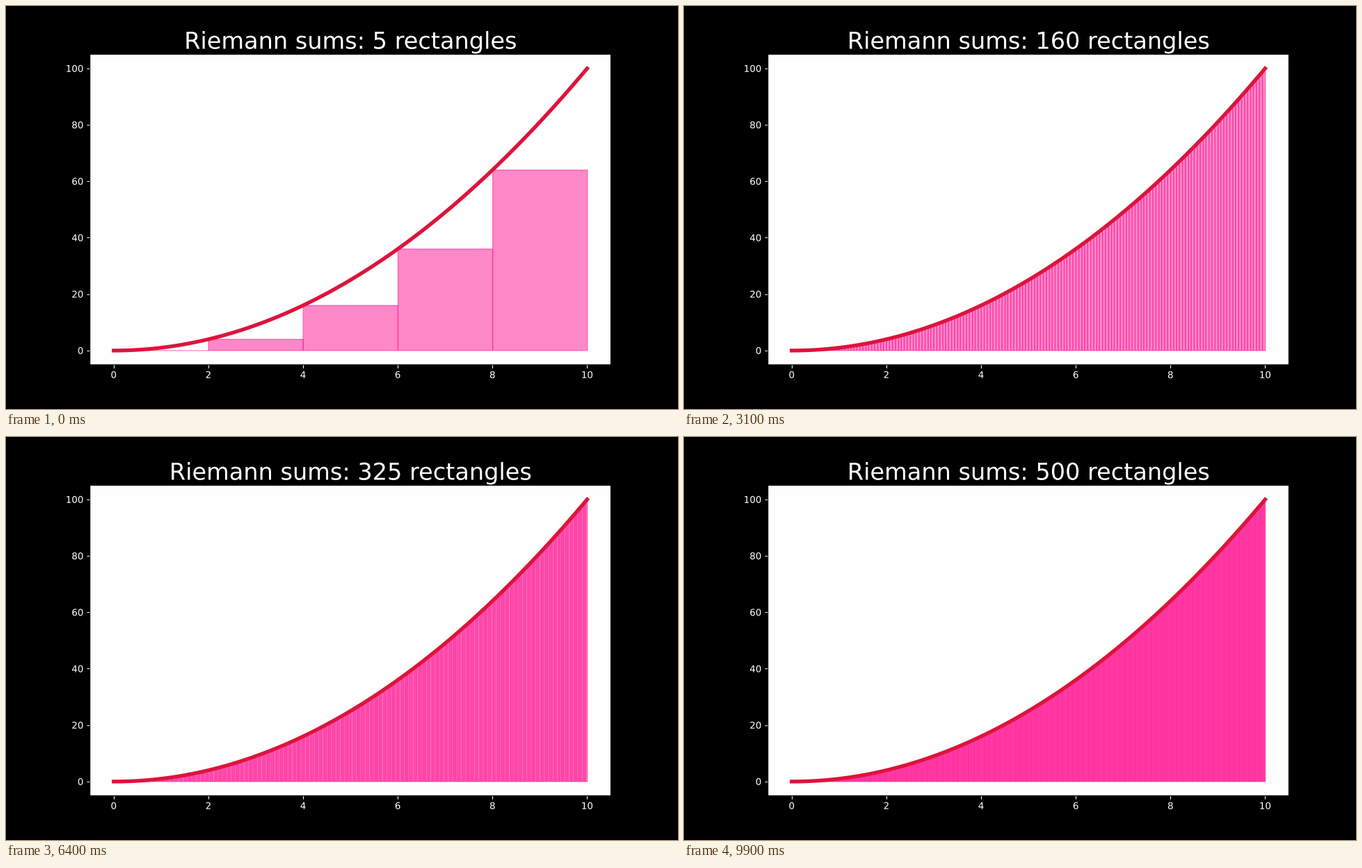
Animation of 966x580 px, one loop 10000 ms. Source, as a matplotlib script:

```python
import numpy as np
import matplotlib.pyplot as plt
from matplotlib.animation import FuncAnimation
from matplotlib.collections import PolyCollection
from matplotlib.patheffects import Normal

WIDTH, HEIGHT, DPI = 966, 580, 96.6
FRAMES, INTERVAL = 100, 100
STEP = 5  # rectangles added per frame
GRID = 2000 * 0.775 / 11  # sub-pixel grid cells per unit of x


def f(x):
    return x ** 2


def align(x):
    """Move x to the centre of the nearest sub-pixel grid cell."""
    return (np.floor((x + 0.5) * GRID + 0.5) + 0.5) / GRID - 0.5


def rectangles(n):
    """Corners of n left-endpoint rectangles under f on [0, 10]."""
    edges = np.linspace(0, 10, n + 1)
    top, base = f(edges[:-1]), np.zeros(n)
    left, right = align(edges[:-1]), align(edges[1:])
    xs = np.stack([left, right, right, left], axis=1)
    ys = np.stack([base, base, top, top], axis=1)
    return np.stack([xs, ys], axis=2)


plt.rcParams.update({
    "font.family": "DejaVu Sans",
    "text.hinting": "none",
    "text.color": "white",
    "xtick.color": "white",
    "ytick.color": "white",
    "path.snap": False,
})

# The tiny offset keeps float rounding from dropping a pixel row.
fig, ax = plt.subplots(
    figsize=((WIDTH + 1e-6) / DPI, (HEIGHT + 1e-6) / DPI), dpi=DPI,
    facecolor="black")
ax.set_facecolor("#fefefe")
ax.set(xlim=(-0.5, 10.5), ylim=(-5, 105),
       xticks=range(0, 11, 2), yticks=range(0, 101, 20))

bars = PolyCollection([], facecolors="deeppink", edgecolors="deeppink",
                      alpha=0.5, linewidths=1, joinstyle="miter", zorder=1)
ax.add_collection(bars, autolim=False)

x = np.linspace(0, 10, 200)
ax.plot(x, f(x), color="crimson", lw=4, zorder=2)
title = ax.set_title("", fontsize=25)

# Drawing text as outlines places it with sub-pixel accuracy.
for text in [title, *ax.get_xticklabels(), *ax.get_yticklabels()]:
    text.set_path_effects([Normal()])


def update(frame):
    n = STEP * (frame + 1)
    bars.set_verts(rectangles(n))
    title.set_text(f"Riemann sums: {n} rectangles")
    return bars, title


anim = FuncAnimation(fig, update, frames=FRAMES, interval=INTERVAL,
                     init_func=lambda: update(0), repeat=True, repeat_delay=0)
plt.show()
```
